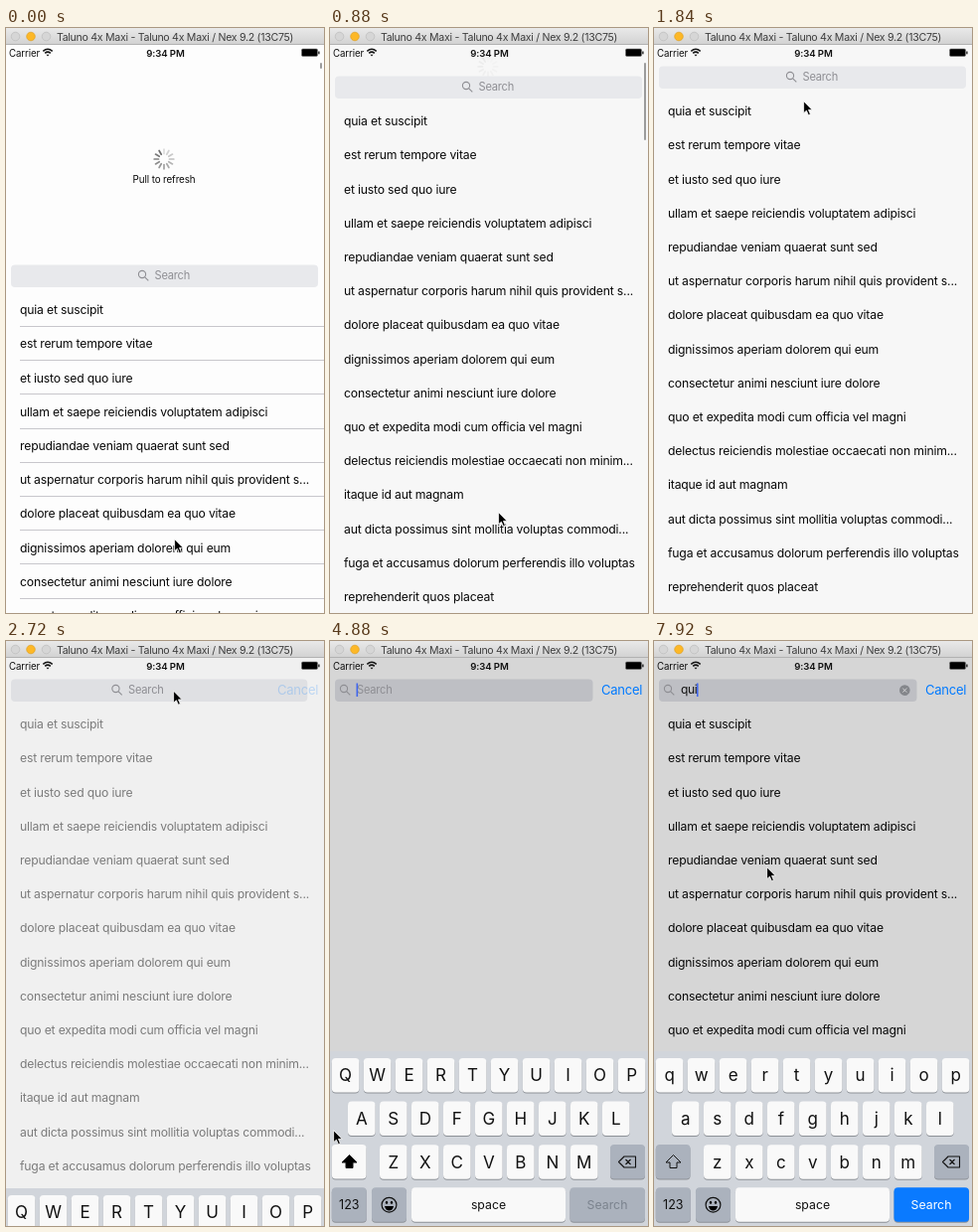
Recreate the animation shown at these times as an HTML page. Size 320 px wide and 589 px high, loop 8000 ms.

```html
<!DOCTYPE html>
<html lang="en">
<head>
<meta charset="utf-8">
<title>List with search</title>
<style>
html, body { margin: 0; width: 100%; height: 100%; overflow: hidden; background: #fdfdfd; }
svg { display: block; width: 320px; height: 589px; }
text { font-family: Inter, Roboto, "Liberation Sans", sans-serif; white-space: pre; }
.row { font-size: 12.2px; letter-spacing: -.18px; fill: #080808; }
.mid { text-anchor: middle; }
</style>
</head>
<body>
<svg id="stage" viewBox="0 0 320 589">
  <defs>
    <linearGradient id="chrome" x2="0" y2="1">
      <stop stop-color="#e9e9e9"/><stop offset="1" stop-color="#d2d2d2"/>
    </linearGradient>
  </defs>
  <rect id="bg" width="320" height="589"/>
  <g id="refresh">
    <g id="spokes" stroke-width="1.7" stroke-linecap="round"/>
    <text class="mid" y="24" font-size="9.8" letter-spacing="-.1" fill="#080808">Pull to refresh</text>
  </g>
  <g id="list">
    <g id="lines" stroke="#c8c7cc"/>
    <g id="rows"/>
  </g>
  <g id="bar">
    <rect id="field" x="5" y="38.5" height="22.5" rx="4"/>
    <g id="glass" fill="none" stroke="#8e8e93" stroke-width="1.1">
      <circle cx="-1" cy="48" r="3.6"/><path d="M1.7 50.8L5.3 54.4"/>
    </g>
    <text id="hint" y="53.3" font-size="11.1" letter-spacing="-.2" fill="#8e8e93">Search</text>
    <text id="query" x="27" y="53.3" font-size="12" letter-spacing="-.3" fill="#111"></text>
    <rect id="caret" y="42.5" width="1.6" height="13.5" fill="#4167ee"/>
    <g id="clear">
      <circle cx="252.3" cy="49.6" r="5.3" fill="#84868b"/>
      <path d="M250.3 47.6l4 4m0-4l-4 4" stroke="#d4d4d6"/>
    </g>
  </g>
  <text id="cancel" x="273" y="54" font-size="13" letter-spacing="-.25" fill="#007aff">Cancel</text>
  <g id="keyboard">
    <rect y="413" width="320" height="180" fill="#d1d5db"/>
    <g id="keys"/>
  </g>
  <rect id="thumb" x="316" y="35" width="2" rx="1" fill="#9b9b9b"/>
  <g id="status">
    <text x="3" y="28.6" font-size="9.7" letter-spacing="-.1" fill="#111">Carrier</text>
    <g fill="none" stroke="#111" stroke-width="1.5">
      <path d="M37.3 23.4q4.7-4.2 9.4 0M39.2 25.4q2.8-2.5 5.6 0"/>
      <path d="M40.5 26.8h3L42 28.5z" fill="#111" stroke="none"/>
    </g>
    <text class="mid" x="160.5" y="28.7" font-size="9.6" font-weight="600" letter-spacing="-.1" fill="#111">9:34 PM</text>
    <rect x="297.5" y="21" width="16" height="7.5" rx="1.3" stroke="#777" stroke-width=".6"/>
    <rect x="314.3" y="23.5" width="1.2" height="2.8"/>
  </g>
  <rect width="320" height="16.5" fill="url(#chrome)"/>
  <path d="M0 16.5H320" stroke="#b2b2b2"/>
  <g stroke-width=".7">
    <circle cx="9.5" cy="8.5" r="4.3" fill="#d6d6d6" stroke="#bcbcbc"/>
    <circle cx="25" cy="8.5" r="4.3" fill="#fdb827" stroke="#dfa023"/>
    <circle cx="40.5" cy="8.5" r="4.3" fill="#d6d6d6" stroke="#bcbcbc"/>
  </g>
  <text class="mid" x="170" y="12.5" font-size="10.6" letter-spacing="-.29" fill="#3e3e3e">Taluno 4x Maxi - Taluno 4x Maxi / Nex 9.2 (13C75)</text>
  <path id="mouse" d="M.6 .7V12.7L3.4 10.2L5.4 14.7L7.4 13.8L5.5 9.4H9.2Z" stroke="#fff" stroke-width=".8"/>
</svg>
<script>
const LOOP = 8000, STEP = 80, PITCH = 34.2;
const $ = id => document.getElementById(id);

function add(parent, tag, attrs, label) {
  const node = document.createElementNS("http://www.w3.org/2000/svg", tag);
  set(node, attrs);
  if (label) node.textContent = label;
  return parent.appendChild(node);
}
function set(node, attrs) {
  for (const name in attrs) node.setAttribute(name, attrs[name]);
}
const clamp = v => Math.max(0, Math.min(1, v));
const mix = (a, b, k) => a + (b - a) * k;
const ramp = (t, from, to) => clamp((t - from) / (to - from));
const ease = k => k * k * (3 - 2 * k);
const blend = (a, b, k) => `rgb(${a.map((v, i) => Math.round(mix(v, b[i], k)))})`;

// Linear track through [time, value] points
function track(points, t) {
  const i = points.findIndex(p => p[0] > t);
  if (i === 0) return points[0][1];
  if (i < 0) return points[points.length - 1][1];
  const [a, b] = [points[i - 1], points[i]];
  return mix(a[1], b[1], ramp(t, a[0], b[0]));
}

const titles = [
  "quia et suscipit", "est rerum tempore vitae", "et iusto sed quo iure",
  "ullam et saepe reiciendis voluptatem adipisci",
  "repudiandae veniam quaerat sunt sed",
  "ut aspernatur corporis harum nihil quis provident s...",
  "dolore placeat quibusdam ea quo vitae",
  "dignissimos aperiam dolorem qui eum",
  "consectetur animi nesciunt iure dolore",
  "quo et expedita modi cum officia vel magni",
  "delectus reiciendis molestiae occaecati non minim...",
  "itaque id aut magnam",
  "aut dicta possimus sint mollitia voluptas commodi...",
  "fuga et accusamus dolorum perferendis illo voluptas",
  "reprehenderit quos placeat"
];
titles.forEach((title, i) => {
  add($("rows"), "text", { class: "row", x: 14, y: 88.2 + PITCH * i }, title);
  add($("lines"), "path", { d: `M14 ${100.5 + Math.round(PITCH * i)}H320` });
});

// Darkest spoke at the upper left, fading counterclockwise
for (let i = 0; i < 12; i++) {
  const shade = 110 + i * 10;
  add($("spokes"), "path", {
    d: "M0 -5.5V-9.8", transform: `rotate(${-30 * (i + 1)})`,
    stroke: `rgb(${shade},${shade},${shade})`
  });
}

function key(x, y, w, fill) {
  const box = { x, width: w, height: 34.5, rx: 4 };
  add($("keys"), "rect", { ...box, y: y + 1, fill: "#8d9197" });
  return add($("keys"), "rect", { ...box, y, fill });
}
function label(x, y, size, str, fill = "#111") {
  return add($("keys"), "text", { class: "mid", x, y, "font-size": size, fill }, str);
}
const LIGHT = "#f9f9f9", DARK = "#abb2bd";
const letters = [];
["QWERTYUIOP", "ASDFGHJKL", "ZXCVBNM"].forEach((line, r) => {
  [...line].forEach((ch, i) => {
    const x = [1.8, 18, 50][r] + 32 * i, y = 420 + 43.6 * r;
    key(x, y, 27.6, LIGHT);
    letters.push(label(x + 13.8, y + 23.4, 17, ch));
  });
});
const shiftKey = key(1.8, 507, 34.7, LIGHT);
const arrow = add($("keys"), "path", {
  d: "M19.5 517.5L27 525H23V530.5H16V525H12Z", stroke: "#111", "stroke-linejoin": "round"
});
key(282, 507, 35, DARK);
add($("keys"), "path", {
  d: "M296 519H307.5V530H296L290.5 524.5ZM297.5 522l5 5m0-5l-5 5",
  fill: "none", stroke: "#111", "stroke-width": 1.1, "stroke-linejoin": "round"
});
key(1.8, 550.3, 35, DARK);
label(19.3, 572, 12.5, "123");
key(42, 550.3, 35, DARK);
add($("keys"), "circle", { cx: 59.5, cy: 567.7, r: 7.4, fill: "none", stroke: "#111", "stroke-width": 1.2 });
add($("keys"), "path", { d: "M55 569H64Q63 573.5 59.5 573.5T55 569Z" });
for (const cx of [57, 62]) add($("keys"), "ellipse", { cx, cy: 565.3, rx: 1.1, ry: 1.6 });
key(82, 550.3, 155, LIGHT);
label(159.5, 571.5, 12.3, "space");
const goKey = key(241.5, 550.3, 75.5, DARK);
const goLabel = label(279, 571.5, 12.3, "Search");

const pull = [[40, 200], [480, 86], [880, 10], [1120, 0]];
const thumb = [[40, 6], [480, 65], [880, 78], [1120, 80]];
const mouseX = [[0, 169], [480, 171.5], [880, 169], [960, 169], [1760, 150], [1840, 150],
  [2320, 168], [3080, 168], [3440, -20], [4560, -20], [4880, 3], [5360, 113]];
const mouseY = [[0, 514], [480, 507], [880, 487], [960, 487], [1760, 73], [1840, 73],
  [2320, 49.5], [3080, 49.5], [3440, 300], [4560, 520], [4880, 492], [5360, 227]];
const blinks = [3360, 3760, 4160, 4560, 4960, 5360, 6800, 7280];
const typing = [5520, 6000, 6320];

function caretAlpha(t) {
  if (t < 2880) return 0;
  const past = blinks.filter(b => b <= t);
  if (!past.length) return 1;
  const k = clamp((t - past[past.length - 1] + STEP) / 160);
  return past.length % 2 ? 1 - k : k;
}

function draw(t) {
  const d = track(pull, t);
  const active = ease(ramp(t, 2600, 3000));
  const count = typing.filter(at => at <= t).length;
  const typed = count > 0;

  const base = mix(253, 247, ramp(t, 0, 880));
  set($("bg"), { fill: blend([base, base, base], [214, 214, 214], active) });

  set($("refresh"), {
    transform: `translate(159 ${34 + d * .49})`,
    opacity: d > 0 ? clamp(d / 120) : 0
  });
  set($("list"), {
    transform: `translate(0 ${d})`,
    opacity: t < 7000 ? 1 - ramp(t, 2600, 2840) : ramp(t, 7600, 7840)
  });
  set($("lines"), { opacity: 1 - ramp(t, 80, 480) });

  set($("bar"), { transform: `translate(0 ${d})` });
  set($("field"), {
    width: mix(309, 259.5, active),
    fill: blend([232, 233, 236], [190, 191, 196], active)
  });
  set($("glass"), { transform: `translate(${mix(138, 15, active)} 0)` });
  set($("hint"), { x: mix(149.5, 27, active), opacity: typed ? 0 : 1 });
  $("query").textContent = "qui".slice(0, count);
  const width = typed ? $("query").getComputedTextLength() : 0;
  set($("caret"), { x: 26.5 + width, opacity: caretAlpha(t) });
  set($("clear"), { opacity: typed ? 1 : 0 });
  set($("cancel"), { opacity: active });

  set($("keyboard"), { transform: `translate(0 ${176 * (1 - active)})` });
  letters.forEach(node => {
    const ch = node.textContent;
    node.textContent = typed ? ch.toLowerCase() : ch.toUpperCase();
  });
  set(shiftKey, { fill: typed ? DARK : LIGHT });
  set(arrow, { fill: typed ? "none" : "#000" });
  set(goKey, { fill: typed ? "#0a7aff" : DARK });
  set(goLabel, { fill: typed ? "#fff" : "#7b838e" });

  set($("thumb"), { height: track(thumb, t), opacity: 1 - ramp(t, 1120, 1520) });
  set($("mouse"), { transform: `translate(${track(mouseX, t)} ${track(mouseY, t)})` });
}

function tick() {
  draw(Math.floor(performance.now() % LOOP / STEP) * STEP);
  requestAnimationFrame(tick);
}
tick();
</script>
</body>
</html>
```
